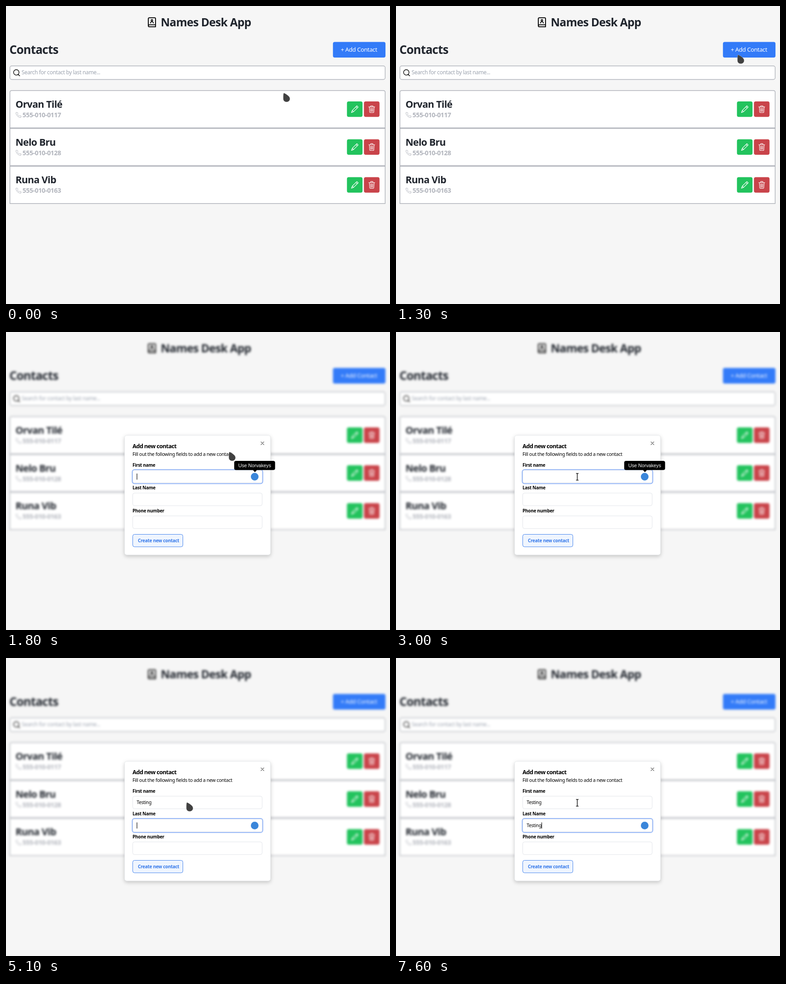
Recreate the animation shown at these times as an HTML page. Size 850 by 659 pixels, loop 8 s.

```html
<!DOCTYPE html>
<html lang="en">
<head>
<meta charset="utf-8">
<title>Contacts</title>
<style>
  html, body { margin: 0; width: 100%; height: 100%; overflow: hidden; background: #f6f6f6; }
  svg { display: block; width: 100vw; height: 100vh; }
  text { font-family: "Noto Sans", "Open Sans", sans-serif; letter-spacing: -.03em; white-space: pre; }
  .semi { font-weight: 600; }
  .line { fill: none; stroke-linecap: round; stroke-linejoin: round; }
  #page.dim { filter: blur(2.4px); }
  #card { filter: drop-shadow(0 3px 4px rgba(0, 0, 0, .2)); }
  #tip text { font-family: "Liberation Sans", Arial, sans-serif; letter-spacing: 0; }
</style>
</head>
<body>
<svg viewBox="0 0 850 659">
  <defs>
    <path id="pencil" class="line" stroke="#fff" stroke-width="1.15"
      d="M12.5 .7L15.3 3.5 5.5 13.3 .8 15.2 2.7 10.5ZM10.4 2.8L13.2 5.6M2.9 10.6L4 12 5.4 13.1"/>
    <path id="trash" class="line" stroke="#fff" stroke-width="1.1"
      d="M1.5 3H14.5M5.5 3V1.6Q5.5.7 6.4.7H9.6Q10.5.7 10.5 1.6V3M2.8 3L3.6 14Q3.7 15.3 5 15.3H11Q12.3 15.3 12.4 14L13.2 3M5.6 5.6L6 12.8M8 5.6V12.8M10.4 5.6L10 12.8"/>
    <path id="phone" class="line" stroke="#b1b4bc" stroke-width="1.7"
      d="M22 16.9v3a2 2 0 0 1-2.2 2 19.8 19.8 0 0 1-8.6-3.1 19.5 19.5 0 0 1-6-6 19.8 19.8 0 0 1-3.1-8.7A2 2 0 0 1 4.1 2h3a2 2 0 0 1 2 1.7 12.8 12.8 0 0 0 .7 2.8 2 2 0 0 1-.4 2.1L8.1 9.9a16 16 0 0 0 6 6l1.3-1.3a2 2 0 0 1 2.1-.4 12.8 12.8 0 0 0 2.8.7A2 2 0 0 1 22 16.9z"/>
  </defs>

  <rect width="850" height="659" fill="#f6f6f6"/>

  <g id="page">
    <g class="line" stroke="#111" stroke-width="2.1">
      <path d="M317.5 26H329Q331 26 331 28V46H317.5Q315 46 315 43.500V28.500Q315 26 317.500 26ZM315.200 43.500Q315.500 41.500 317.500 41.500H331"/>
      <circle cx="323" cy="31.600" r="1.700" stroke-width="1.800"/>
      <path d="M319.800 37.600Q320.300 34.600 323 34.600T326.200 37.600" stroke-width="1.800"/>
    </g>
    <text class="semi" x="342.500" y="45" font-size="25" fill="#20252d">Names Desk App</text>
    <text class="semi" x="7.500" y="105.500" font-size="26" fill="#20252d">Contacts</text>
    <rect x="723.700" y="79.500" width="116.300" height="34.500" rx="4" fill="#337bf8"/>
    <text x="741" y="101" font-size="13" font-weight="500" fill="#fff">+ Add Contact</text>
    <rect x="8.700" y="132.500" width="830.600" height="30" rx="4" fill="#fff" stroke="#b0b3ba" stroke-width="1.400"/>
    <path class="line" d="M26.900 151.200L30.300 154.400M28.800 146.800A6 6 0 1 1 16.800 146.800A6 6 0 1 1 28.800 146.800" stroke="#111" stroke-width="1.500"/>
    <text x="34.500" y="151" font-size="12" fill="#9ca3af">Search for contact by last name...</text>
    <g id="rows"></g>
  </g>

  <g id="modal">
    <rect id="card" x="262.500" y="228.500" width="323" height="264.500" rx="5" fill="#fff" stroke="#e3e5e8" stroke-width=".8"/>
    <text class="semi" x="280" y="257" font-size="12.800" style="letter-spacing:-.05em">Add new contact</text>
    <text x="280" y="274" font-size="10.600">Fill out the following fields to add a new contact</text>
    <path class="line" d="M564.300 242.800L570.900 249.400M570.900 242.800L564.300 249.400" stroke="#555" stroke-width="1.100"/>
    <g id="fields"></g>
    <rect x="280.500" y="447.500" width="111" height="27.500" rx="4" fill="#eff5fe" stroke="#4383ee"/>
    <text class="semi" x="292" y="464.500" font-size="10" fill="#3478ea">Create new contact</text>
    <g id="focus">
      <rect x="279.400" y="304.300" width="289" height="31" rx="5" fill="none" stroke="#8bb0f8" stroke-width="1.800"/>
      <circle id="badge" cx="550.500" cy="320" r="8.500" fill="#3a86da"/>
      <rect id="caret" y="313" width="1.200" height="13.500" fill="#111"/>
    </g>
    <g id="tip">
      <rect id="tipBox" y="285" height="20.300" rx="4"/>
      <path id="tipArrow" d="M546.500 305H555.500L551 310Z"/>
      <text id="tipText" x="550.500" y="299" text-anchor="middle" fill="#fff">Use Norvakeys</text>
    </g>
  </g>

  <path id="arrow" fill="#414141" stroke="#fff" stroke-opacity=".5" stroke-width=".6"
    d="M1.200.3C2.200-.3 9 4 12 7C14 9 14.800 11 14.800 13C14.800 17 11.500 20 7.500 20C3 20 0 17 0 13C0 9-.2 1.500 1.200.3Z"/>
  <path id="beam" class="line" stroke="#333" stroke-width="1.700"
    d="M-2-7.500Q0-7.500 0-6Q0-7.500 2-7.500M0-6V6M-2 7.500Q0 7.500 0 6Q0 7.500 2 7.500"/>
</svg>

<script>
const LOOP = 8000, STEP = 100, PITCH = 83.7, FIELD_GAP = 50.6;
const $ = id => document.getElementById(id);
const show = (id, on) => $(id).setAttribute('display', on ? 'inline' : 'none');
const move = (id, x, y) => $(id).setAttribute('transform', `translate(${x} ${y})`);

const people = [
  ['Orvan Tilé', '555-010-0117'],
  ['Nelo Bru', '555-010-0128'],
  ['Runa Vib', '555-010-0163']
];
$('rows').innerHTML = people.map(([name, number], i) => `
  <g transform="translate(0 ${187 + i * PITCH})">
    <path d="${i ? 'M8.7 0H839.3V82.4H8.7Z' : 'M8.7 82.4V4Q8.7 0 12.7 0H835.3Q839.3 0 839.3 4V82.4Z'}"
      fill="#fff" stroke="#b0b3ba" stroke-width="1.5"/>
    <text class="semi" x="21" y="38" font-size="21.5" fill="#20252d">${name}</text>
    <use href="#phone" transform="translate(20.700 47.200) scale(.57)"/>
    <text class="semi" x="36.500" y="59" font-size="14.200" fill="#b1b4bc">${number}</text>
    <rect x="754.700" y="24" width="34.500" height="34.300" rx="4" fill="#22c35d"/>
    <rect x="792.300" y="24" width="34.500" height="34.300" rx="4" fill="#c9444a"/>
    <use href="#pencil" transform="translate(763.800 33) scale(1.03)"/>
    <use href="#trash" transform="translate(801.400 33) scale(1.03)"/>
  </g>`).join('');

$('fields').innerHTML = ['First name', 'Last Name', 'Phone number'].map((label, i) => `
  <g transform="translate(0 ${i * FIELD_GAP})">
    <text class="semi" x="280" y="297.500" font-size="10">${label}</text>
    <rect x="280.500" y="305.500" width="286.500" height="28" rx="4" fill="#fff" stroke="#e2e5ea"/>
    <text id="value${i}" x="289.300" y="323" font-size="10.300"></text>
  </g>`).join('');

// [time, characters of "Testing" typed so far]
const typing = [
  [[3400, 2], [3600, 3], [3700, 4], [4900, 7]],
  [[5600, 1], [5800, 4], [6200, 5], [6300, 7]]
];
const caretOff = [[2000, 2500], [3000, 3400], [4300, 4900], [7000, 7600]];
const within = (t, [a, b]) => t >= a && t < b;
const typed = (keys, t) => 'Testing'.slice(0, keys.reduce((n, [at, len]) => t >= at ? len : n, 0));

const ease = p => p * p * (3 - 2 * p);
const glide = (t, start, a, b) => {
  const p = ease(Math.max(0, Math.min(1, (t - start + STEP) / 600)));
  return a.map((v, i) => v + (b[i] - v) * p);
};

function pointer(t) {
  if (t < 1500) return glide(t, 400, [613.7, 192.3], [755.8, 107.7]);
  if (t < 5100) return glide(t, 1500, [755.8, 107.7], [401.3, 320.2]);
  return t < 5300 ? [399.2, 319.2] : [401.3, 320.2];
}

function draw(time) {
  const t = Math.floor(time / STEP) * STEP;
  const open = t >= 1400;
  $('page').classList.toggle('dim', open);
  show('modal', open);

  typing.forEach((keys, i) => $('value' + i).textContent = typed(keys, t));

  const active = t < 5100 ? 0 : 1;
  const value = $('value' + active);
  move('focus', 0, active * FIELD_GAP);
  $('caret').setAttribute('x', 289.3 + (value.textContent ? value.getComputedTextLength() : 0));
  show('caret', !caretOff.some(span => within(t, span)));
  show('badge', t >= 1500);

  const grown = t >= 1500;
  const tipWidth = grown ? 90.5 : 88;
  show('tip', t < 3400);
  show('tipArrow', grown);
  $('tipBox').setAttribute('x', 550.4 - tipWidth / 2);
  $('tipBox').setAttribute('width', tipWidth);
  $('tipText').setAttribute('font-size', grown ? 10.7 : 10.4);

  const [x, y] = pointer(t);
  const overField = open && x > 280 && x < 567 && y > 305 && y < 334 && !within(t, [5100, 5300]);
  show('arrow', !overField);
  show('beam', overField);
  move(overField ? 'beam' : 'arrow', x, y);
}

const start = performance.now();
function tick() {
  draw((performance.now() - start) % LOOP);
  requestAnimationFrame(tick);
}
tick();
</script>
</body>
</html>
```
